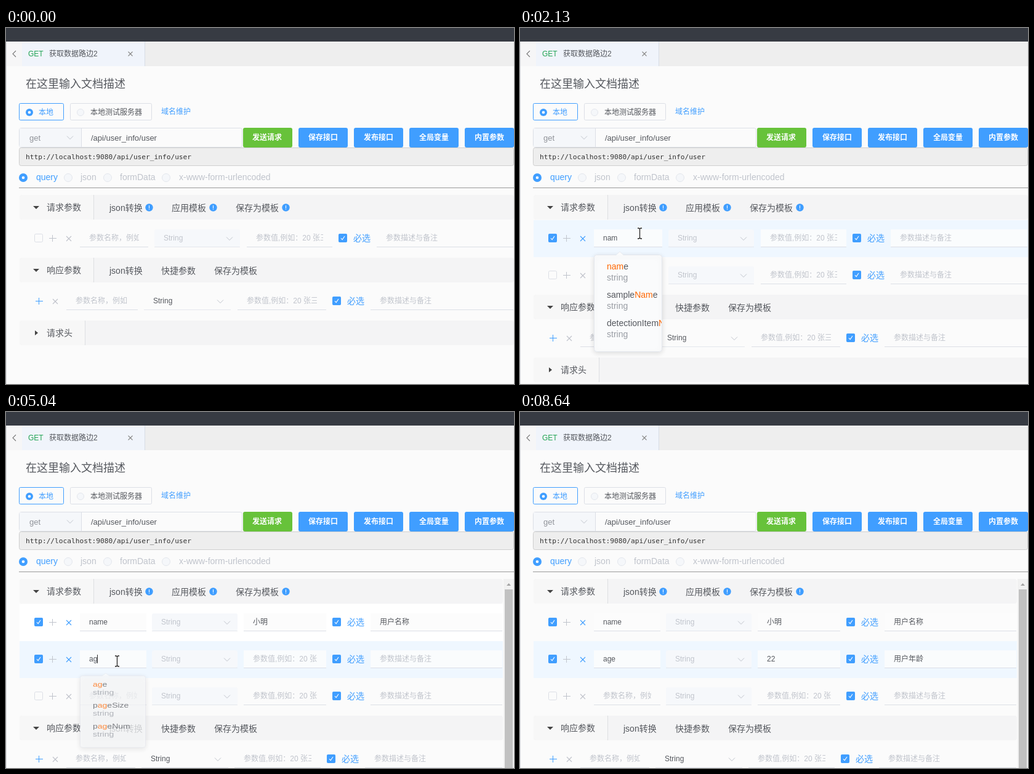
An HTML page with a canvas for the animation above (8.7 s loop, 825 by 578 pixels).

```html
<!DOCTYPE html>
<html lang="zh">
<head>
<meta charset="utf-8">
<style>
html, body { margin: 0; width: 100%; height: 100%; overflow: hidden; background: #fbfbfb; }
canvas { display: block; }
</style>
</head>
<body>
<canvas id="stage" width="825" height="578"></canvas>
<script>
const c = document.getElementById('stage').getContext('2d');
const LOOP = 8700;
const SANS = '"Liberation Sans", Arial, "Noto Sans CJK SC", "Noto Sans CJK", sans-serif';
const MONO = '"DejaVu Sans Mono", monospace';
const BLUE = '#409eff', DARK = '#55585e', PALE = '#c0c4cc', LINE = '#dcdfe6', PAGE = '#fbfbfb';

// Moments of the user's actions
const FOCUS1 = 630, TYPE1 = 1350, PICK1 = 2520;
const FOCUS2 = 4230, TYPE2 = 4440, PICK2 = 6600;
const CARET = [[FOCUS1, 1170], [TYPE1, 2100], [2620, 3210], [3740, 5230], [5250, 5790], [6300, 6780], [7290, 7820], [8310, 8640]];

// Pointer path: time, x, y
const MOVES = [
  [60, 817, 62], [120, 806, 95], [480, 300, 300], [600, 194, 333], [3600, 194, 333],
  [3810, 185, 428], [3900, 179, 416], [4050, 180, 404], [7440, 180, 404],
  [7560, 230, 385], [7860, 785, 126], [7950, 815, 77]
];

const COLS = {
  wide: { name: [120, 231], type: [241, 380], value: [391, 530], check: 540, note: 602, end: 825 },
  slim: { name: [120, 228], type: [237, 376], value: [386, 520], check: 530, note: 592, end: 807 },
  replyWide: { name: [98, 214], type: [224, 365], value: [376, 520], check: 530, note: 592, end: 825 },
  replySlim: { name: [98, 210], type: [220, 361], value: [371, 511], check: 521, note: 583, end: 807 }
};

const clamp = v => Math.max(0, Math.min(1, v));
const easeOut = v => 1 - (1 - clamp(v)) ** 5;

// The last entry whose time has come
const at = (t, steps) => steps.reduce((now, [time, v]) => t >= time ? v : now, '');

function box(x, y, w, h, fill, edge, r = 0) {
  c.beginPath();
  if (edge) c.roundRect(x + .5, y + .5, w - 1, h - 1, r);
  else c.roundRect(x, y, w, h, r);
  if (fill) { c.fillStyle = fill; c.fill(); }
  if (edge) { c.strokeStyle = edge; c.lineWidth = 1; c.stroke(); }
}

function text(s, x, y, size = 12, color = DARK, font = SANS, weight = 400) {
  c.font = `${weight} ${size}px ${font}`;
  c.fillStyle = color;
  c.fillText(s, x, Math.round(y + size * .36));
  return x + c.measureText(s).width;
}

function line(points, color, width = 1) {
  c.beginPath();
  points.forEach(([x, y]) => c.lineTo(x, y));
  c.strokeStyle = color;
  c.lineWidth = width;
  c.stroke();
}

function shape(points, color) {
  c.beginPath();
  points.forEach(([x, y]) => c.lineTo(x, y));
  c.fillStyle = color;
  c.fill();
}

function dot(x, y, r, fill, edge) {
  c.beginPath();
  c.arc(x, y, r, 0, 7);
  c.fillStyle = fill;
  c.fill();
  if (edge) { c.strokeStyle = edge; c.lineWidth = 1; c.stroke(); }
}

function radio(x, y, r, on) {
  dot(x, y, on ? r : r - .5, on ? BLUE : '#f5f7fa', on ? null : '#e4e7ed');
  if (on) dot(x, y, 2.3, '#fff');
}

const chevron = (x, y) => line([[x - 5, y - 2.5], [x, y + 2.5], [x + 5, y - 2.5]], PALE);

function plus(x, y, color) {
  box(x - 6, y, 12, 1, color);
  box(x - 1, y - 5, 1, 11, color);
}

function cross(x, y, color, r = 4) {
  line([[x - r, y - r], [x + r, y + r]], color, 1.1);
  line([[x - r, y + r], [x + r, y - r]], color, 1.1);
}

function checkbox(x, y, on = 1) {
  box(x, y - 7, 14, 14, null, LINE, 2);
  c.globalAlpha = on;
  box(x, y - 7, 14, 14, BLUE, null, 2);
  line([[x + 4, y + .3], [x + 6.2, y + 2.6], [x + 10, y - 3]], '#fff', 1.1);
  c.globalAlpha = 1;
}

function field([left, right], y, value, hint, fill) {
  if (fill) box(left, y - 14, right - left, 28, fill);
  box(left, y + 14, right - left, 1, LINE);
  c.save();
  c.beginPath();
  c.rect(left + 15, y - 14, right - left - 30, 28);
  c.clip();
  text(value || hint, left + 15, y, 12, value ? DARK : PALE);
  c.restore();
}

function fields(k, y, row, reply) {
  field(k.name, y, row.name, '参数名称，例如', row.fill);
  const [left, right] = k.type;
  if (!reply) box(left, y - 14, right - left, 28, '#f6f8fb', null, 3);
  box(left, y + 14, right - left, 1, '#e4e7ed');
  text('String', left + 15, y, 12, reply ? DARK : PALE);
  chevron(right - 17, y + 1);
  field(k.value, y, row.value, '参数值,例如：20 张三', row.fill);
  checkbox(k.check, y);
  text('必选', k.check + 24, y, 14, BLUE);
  field([k.note, k.end - 1], y, row.note, '参数描述与备注', row.fill);
}

function requestRow(k, y, row) {
  if (row.back) box(22, y - 29, k.end - 22, 60, row.back);
  checkbox(46, y, row.on);
  plus(76, y, PALE);
  cross(102, y + 1, row.on ? BLUE : PALE);
  fields(k, y, row);
}

function section(y, title, end, split, open) {
  box(22, y - 20, end - 22, 40, '#f4f4f5', null, 4);
  box(22, y - 20, split - 22, 40, '#f7f7f7', null, 4);
  box(split, y - 20, 1, 40, '#dedfe2');
  shape(open ? [[44, y - 2], [54, y - 2], [49, y + 3]] : [[47, y - 4], [52, y], [47, y + 4]], '#444');
  text(title, 66, y, 14);
}

function info(x, y) {
  dot(x + .5, y - .5, 6.2, BLUE);
  box(x, y - 4, 1, 5, '#fff');
  box(x, y + 2, 1, 1, '#fff');
}

function page(hoverTitle) {
  box(0, 0, 825, 578, PAGE);
  box(0, 22, 825, 40, '#eeeeee');
  box(0, 22, 26, 40, '#f6f6f7');
  box(26, 22, 199, 40, '#f0f4fb');
  box(225, 22, 1, 40, '#d8dce5');
  box(0, 0, 825, 22, '#373b43');
  box(0, 22, 1, 556, '#dcdde2');
  line([[16, 37], [11, 42], [16, 47]], '#777', 1.1);
  text('GET', 36, 42, 12, '#23a455');
  text('获取数据路边2', 70, 42);
  cross(202, 42, '#888', 3.5);

  if (hoverTitle) box(21, 72, 804, 38, null, LINE, 3);
  text('在这里输入文档描述', 32, 91, 18);

  box(21, 122, 73, 28, PAGE, BLUE, 2);
  radio(38, 137, 6, true);
  text('本地', 53, 137, 12, BLUE);
  box(104, 122, 133, 28, null, LINE, 2);
  radio(121, 137, 6);
  text('本地测试服务器', 137, 137);
  text('域名维护', 252, 136, 12, BLUE);

  box(21, 162, 363, 32, PAGE, LINE, 3);
  box(22, 163, 100, 30, '#f5f7fa');
  box(122, 162, 1, 32, LINE);
  text('get', 38, 178, 13, '#909399');
  chevron(104, 178);
  text('/api/user_info/user', 138, 178, 13);
  ['发送请求', '保存接口', '发布接口', '全局变量', '内置参数'].forEach((label, i) => {
    box(385 + i * 90, 162, 80, 32, i ? BLUE : '#67c23a', null, 3);
    text(label, 401 + i * 90 - (i ? 0 : 1), 178, 12, '#fff', SANS, 700);
  });

  box(21, 194, 804, 30, '#eeeeee', '#cfcfcf', 3);
  text('http://localhost:9080/api/user_info/user', 32, 209, 11.18, '#333', MONO);

  [[28, 'query', 49], [101, 'json', 121], [165, 'formData', 185], [260, 'x-www-form-urlencoded', 281]]
    .forEach(([x, label, tx], i) => {
      radio(x, 243, 7, !i);
      text(label, tx, 242, 14, i ? PALE : BLUE);
    });
  box(21, 259, 804, 1, '#999');
}

// Suggestions: each entry is [before, matched, after]
function popup(top, right, items, grow, pale) {
  if (grow <= .01) return;
  c.save();
  c.globalAlpha = grow;
  c.translate(0, top);
  c.scale(1, grow);
  c.shadowColor = 'rgba(0,0,0,.12)';
  c.shadowBlur = 9;
  c.shadowOffsetY = 2;
  box(120, 0, right - 120, 158, '#fafbfc', '#e4e7ed', 4);
  c.shadowColor = 'transparent';
  shape([[156, 1], [162, -5], [168, 1]], '#fafbfc');
  line([[156, .5], [162, -5], [168, .5]], '#e8ebf0');
  if (pale) box(121, 56, right - 122, 36, '#fff');
  c.beginPath();
  c.rect(121, 0, right - 122, 158);
  c.clip();
  items.forEach(([before, match, after], i) => {
    const y = 19 + i * 46;
    let x = text(before, 141, y, 14);
    x = text(match, x, y, 14, '#ff6600');
    text(after, x, y, 14);
    text('string', 141, y + 18, 14, '#999da4');
  });
  c.restore();
}

const grow = (t, open, close) => t < open ? 0 : t < close ? easeOut((t - open) / 300) : 1 - easeOut((t - close) / 300);

function pointer(t) {
  const i = MOVES.findIndex(m => m[0] > t);
  if (i < 1) return null;
  const [t0, x0, y0] = MOVES[i - 1], [t1, x1, y1] = MOVES[i];
  const p = (t - t0) / (t1 - t0);
  return [x0 + (x1 - x0) * p, y0 + (y1 - y0) * p];
}

const ARROW = new Path2D('M0 0V16L4 12.5L6.5 18L9 17L6.5 11.5H11.5Z');
const HAND = new Path2D('M-1.5 1Q0 -1 1.5 1V8Q3 6 4.5 8Q6 7 7.5 9Q10 8 10.5 11V16Q10 19 8 22H0Q-3 18 -6 13Q-6 10 -3.5 11L-1.5 13Z');

function drawPointer([x, y]) {
  const inText = y > 72 && y < 110 || x < 232 && [341, 401].some(row => Math.abs(y - row) < 14);
  c.save();
  c.translate(Math.round(x), Math.round(y));
  if (inText) {
    for (const [color, width] of [['#fff', 3], ['#222', 1.3]]) {
      line([[.5, -7], [.5, 8]], color, width);
      line([[-3, -8], [-1, -8], [.5, -7], [2, -8], [4, -8]], color, width);
      line([[-3, 9], [-1, 9], [.5, 8], [2, 9], [4, 9]], color, width);
    }
  } else {
    const path = x < 240 && y > 327 ? HAND : ARROW;
    c.fillStyle = '#fff';
    c.fill(path);
    c.strokeStyle = '#222';
    c.lineWidth = 1.2;
    c.stroke(path);
  }
  c.restore();
}

function draw(t) {
  const slim = t >= TYPE2;
  const k = slim ? COLS.slim : COLS.wide;
  const spot = pointer(t);
  const second = t >= FOCUS2;
  const active = { back: '#eff7ff', fill: '#fafcfd' };
  const rows = [{
    name: at(t, [[TYPE1, 'n'], [1440, 'na'], [1530, 'nam'], [PICK1, 'name']]),
    value: at(t, [[PICK1, '小明']]),
    note: at(t, [[PICK1, '用户名称']]),
    on: clamp((t - TYPE1) / 200),
    ...(second ? { back: t < 7560 ? '#fff' : null, fill: '#fcfcfc' } : t >= FOCUS1 ? active : {})
  }];
  if (t >= TYPE1) rows.push({
    name: at(t, [[TYPE2, 'a'], [4680, 'ag'], [5250, 'age']]),
    value: at(t, [[PICK2, '22']]),
    note: at(t, [[PICK2, '用户年龄']]),
    on: clamp((t - TYPE2) / 200),
    ...(second ? active : {})
  });
  if (slim) rows.push({ on: 0 });

  page(spot && spot[1] > 72 && spot[1] < 110);
  section(291, '请求参数', k.end, 142, true);
  [['json转换', 168, 232], ['应用模板', 269, 336], ['保存为模板', 373, 454]].forEach(([label, x, mark]) => {
    text(label, x, 292, 14);
    info(mark, 292);
  });
  rows.forEach((row, i) => {
    const y = 341 + i * 60;
    if (spot && Math.abs(spot[1] - y) < 30) row.back ??= '#f7f8fa';
    requestRow(k, y, row);
  });

  const y = 333 + rows.length * 60;
  section(y, '响应参数', k.end, 142, true);
  [['json转换', 168], ['快捷参数', 252], ['保存为模板', 338]].forEach(([label, x]) => text(label, x, y + 1, 14));
  plus(54, y + 50, BLUE);
  cross(80, y + 51, PALE);
  fields(slim ? COLS.replySlim : COLS.replyWide, y + 50, {}, true);
  section(y + 102, '请求头', k.end, 128, false);

  if (slim) {
    box(808, 271, 17, 307, '#f1f1f1');
    shape([[813, 282], [816.5, 278], [820, 282]], '#a3a3a3');
    box(810, 288, 13, 290, '#c1c1c1');
  }

  if (CARET.some(([on, off]) => t >= on && t < off)) {
    const row = second ? 1 : 0;
    c.font = `12px ${SANS}`;
    const x = 135 + Math.round(c.measureText(rows[row].name).width);
    box(x, 334 + row * 60, 1, 14, '#333');
  }

  popup(368, 231, [['', 'nam', 'e'], ['sample', 'Nam', 'e'], ['detectionItem', 'Nam', 'e']], grow(t, 1880, PICK1));
  const [match, rest] = t >= 5550 ? ['age', ''] : ['ag', 'e'];
  popup(428, 227, [['', match, rest], ['p', match, rest + 'Size'], ['p', match, rest + 'Num']],
    grow(t, 4970, PICK2), t >= 5940);

  if (spot) drawPointer(spot);
}

const start = performance.now();
function tick() {
  draw((performance.now() - start) % LOOP);
  requestAnimationFrame(tick);
}
tick();
</script>
</body>
</html>
```
